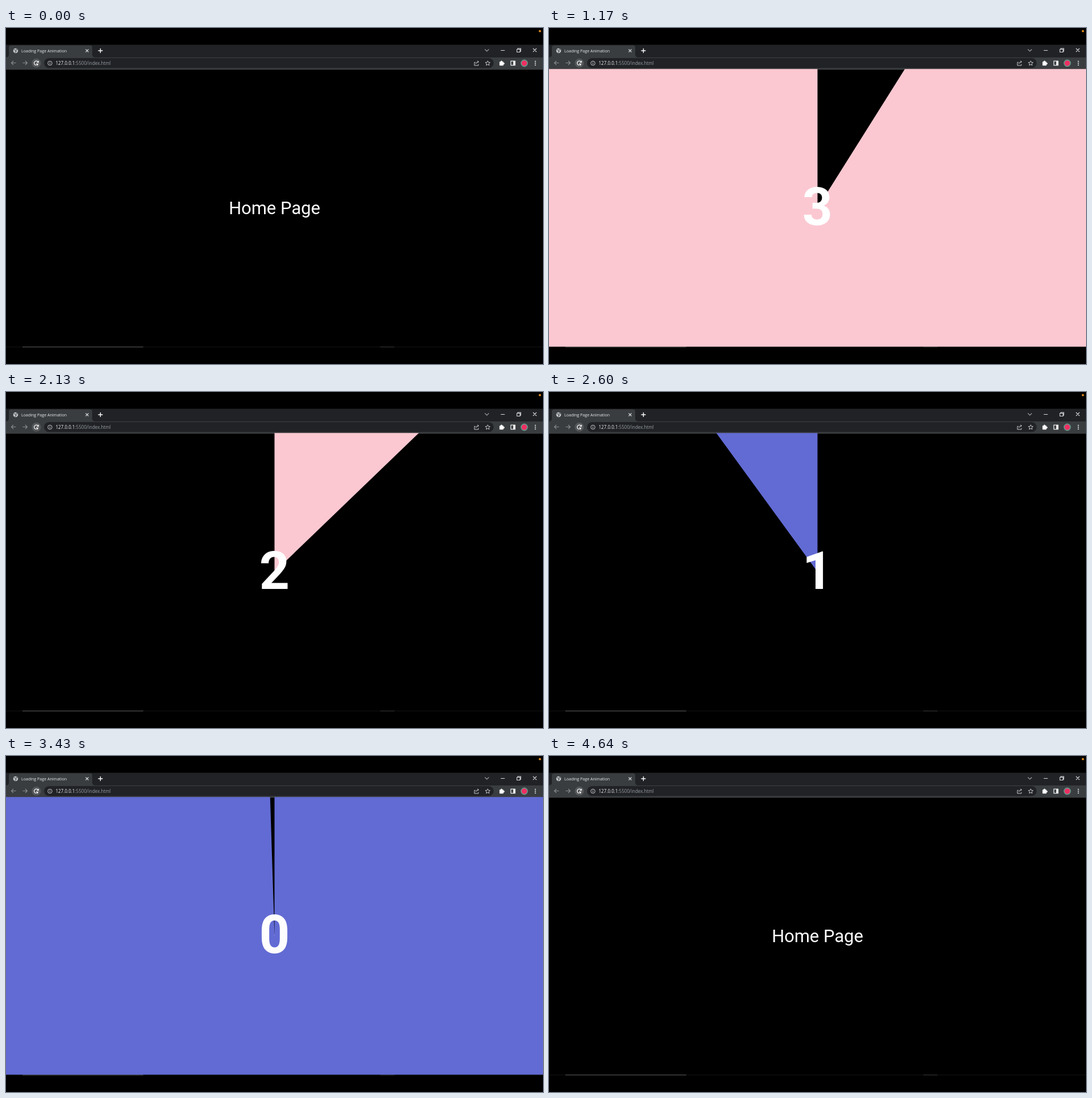
An HTML page that plays this animation: 947x592 px, repeating every 4.68 s.

```html
<!DOCTYPE html>
<html lang="en">
<head>
<meta charset="utf-8">
<title>Loading Page Animation</title>
<style>
  html, body { margin: 0; width: 100%; height: 100%; overflow: hidden; background: #000; }
  svg { display: block; width: 100%; height: 100%; }
  .ui { font-family: "Open Sans", "Noto Sans", sans-serif; }
  .page { font-family: Roboto, sans-serif; text-anchor: middle; fill: #fff; }
  .line { fill: none; stroke: #dadce0; stroke-width: 1.1; }
</style>
</head>
<body>
<svg viewBox="0 0 947 592">
  <defs><clipPath id="view"><rect y="72.300" width="947" height="489.200"/></clipPath></defs>
  <rect width="947" height="592" fill="#000"/>
  <circle cx="941.5" cy="5.5" r="2" fill="#e08a1e"/>

  <g class="ui">
    <rect y="29.5" width="947" height="22" fill="#202225"/>
    <path d="M0 51.5q5 0 5-5V34.500q0-4 4-4H148q4 0 4 4V46.500q0 5 5 5H947V73.500H0z" fill="#3a3d40"/>
    <rect x="67" y="53" width="793" height="17.500" rx="8.750" fill="#202225"/>
    <circle cx="17" cy="40" r="4.300" fill="#c4c7ca"/>
    <path d="M14 38.500l3 .5 1 2-2 2M18 36.500l2 2.500" fill="none" stroke="#3a3d40" stroke-width="1.200"/>
    <text x="27" y="42.500" font-size="7.080" fill="#e8eaed">Loading Page Animation</text>
    <g class="line">
      <path d="M140.500 37.500l5 5m0-5l-5 5"/>
      <path d="M162.500 40h8m-4-4v8" stroke="#fff" stroke-width="1.400"/>
      <path d="M844.500 37.500l3.500 3.500 3.500-3.500" stroke="#a0a3a6"/>
      <path d="M872.500 39.500h7M901 37.500h5.500v5h-5.500zM902.500 37.300v-1.300h5.300v5h-1.300M929.500 36l6 6m0-6l-6 6"/>
      <path d="M17.500 61.500h-8m3.500-3.500l-3.500 3.500 3.500 3.500M29.500 61.500h8m-3.500-3.500l3.500 3.500-3.500 3.500" stroke="#8b8f93"/>
      <circle cx="77.500" cy="62" r="3.700" stroke-width=".9"/>
      <path d="M77.500 61.500v2.500m0-4.300v1" stroke-width=".9"/>
      <path d="M828 60.500h-2v5.500h7v-2.500M828.500 63.500q.5-4 4.500-4h.5m-2-2l2 2-2 2" stroke-width=".9"/>
      <path d="M849.500 57.800l1.200 2.700 3 .3-2.300 2 .7 3-2.600-1.600-2.600 1.600.7-3-2.300-2 3-.3z" stroke-width=".9"/>
      <rect x="890.300" y="58.200" width="7.500" height="7.500" stroke="#fff"/>
    </g>
    <g fill="#fff">
      <rect x="894.500" y="58" width="3.500" height="8"/>
      <rect x="870.300" y="59.300" width="7" height="7" rx=".8"/>
      <circle cx="873.800" cy="59" r="1.600"/>
      <circle cx="877.600" cy="62.600" r="1.600"/>
      <circle cx="933.500" cy="58.700" r="1"/>
      <circle cx="933.500" cy="62" r="1"/>
      <circle cx="933.500" cy="65.300" r="1"/>
    </g>
    <circle cx="914" cy="62" r="5.600" fill="#ee2f62" stroke="#5f9c8d" stroke-width="1.600"/>
    <text x="87.500" y="65" font-size="8.040" fill="#9aa0a6"><tspan fill="#f1f3f4">127.0.0.1</tspan>:5500/index.html</text>
    <circle cx="53.500" cy="61.800" r="8" fill="#55585b"/>
    <path d="M56.500 59.700a3.700 3.700 0 1 0 .6 2.800M57.200 57.800v2.700h-2.700" fill="none" stroke="#fff" stroke-width="1.200"/>
    <path d="M53.300 60.300v7l1.700-1.500 1.200 2.400 1-.5-1.200-2.300h2.200z" fill="#fff" stroke="#000" stroke-width=".5"/>
  </g>

  <path d="M0 562h947" stroke="#141414"/>
  <path d="M29 562h213" stroke="#5a5a5a"/>
  <path d="M660 562h25" stroke="#343434"/>

  <g class="page">
    <text id="home" x="473.500" y="328" font-size="31">Home Page</text>
    <path id="pie" clip-path="url(#view)"/>
    <text id="digit" x="473.500" y="347" font-size="93" font-weight="700"></text>
  </g>
</svg>
<script>
const LOOP = 4680, CX = 473.5, CY = 317, R = 700;
const LOAD = 380, STEP = 1000, FADE = 800;
const PINK = '#fbc8d1', BLUE = '#626bd3';
const [home, pie, digit] = ['home', 'pie', 'digit'].map(id => document.getElementById(id));

// cubic-bezier(.42, 0, .58, 1)
function easeInOut(x) {
  if (x <= 0 || x >= 1) return x <= 0 ? 0 : 1;
  let lo = 0, hi = 1;
  for (let i = 0; i < 24; i++) {
    const s = (lo + hi) / 2, r = 1 - s;
    if (1.26 * s * r * r + 1.74 * s * s * r + s * s * s < x) lo = s;
    else hi = s;
  }
  return lo * lo * (3 - 2 * lo);
}

function rim(deg) {
  const a = deg * Math.PI / 180;
  return `${(CX + R * Math.sin(a)).toFixed(2)} ${(CY - R * Math.cos(a)).toFixed(2)}`;
}

function sector(from, to) {
  if (to - from < 0.05) return '';
  if (to - from > 359.95) return 'M0 0H947V592H0z';
  return `M${CX} ${CY}L${rim(from)}A${R} ${R} 0 ${to - from > 180 ? 1 : 0} 1 ${rim(to)}z`;
}

// four one-second counts: the pie fills counterclockwise, then empties the same way
function render(t) {
  const step = Math.floor((t - LOAD) / STEP);
  const loading = step >= 0 && step < 4;
  const edge = 360 * (1 - easeInOut((t - LOAD) / STEP - step));
  const fade = easeInOut((t - LOAD - 3 * STEP) / FADE);
  const scale = 1 + 1.7 * fade;

  home.style.display = loading && step < 3 ? 'none' : '';
  pie.setAttribute('d', !loading ? '' : step % 2 ? sector(0, edge) : sector(edge, 360));
  pie.setAttribute('fill', step < 2 ? PINK : BLUE);
  digit.textContent = loading ? 3 - step : '';
  digit.setAttribute('opacity', 1 - fade);
  digit.setAttribute('transform',
    `translate(${CX} 317.5) scale(${scale}) translate(${-CX} -317.5)`);
}

const start = performance.now();
function tick() {
  render((performance.now() - start) % LOOP);
  requestAnimationFrame(tick);
}
tick();
</script>
</body>
</html>
```
